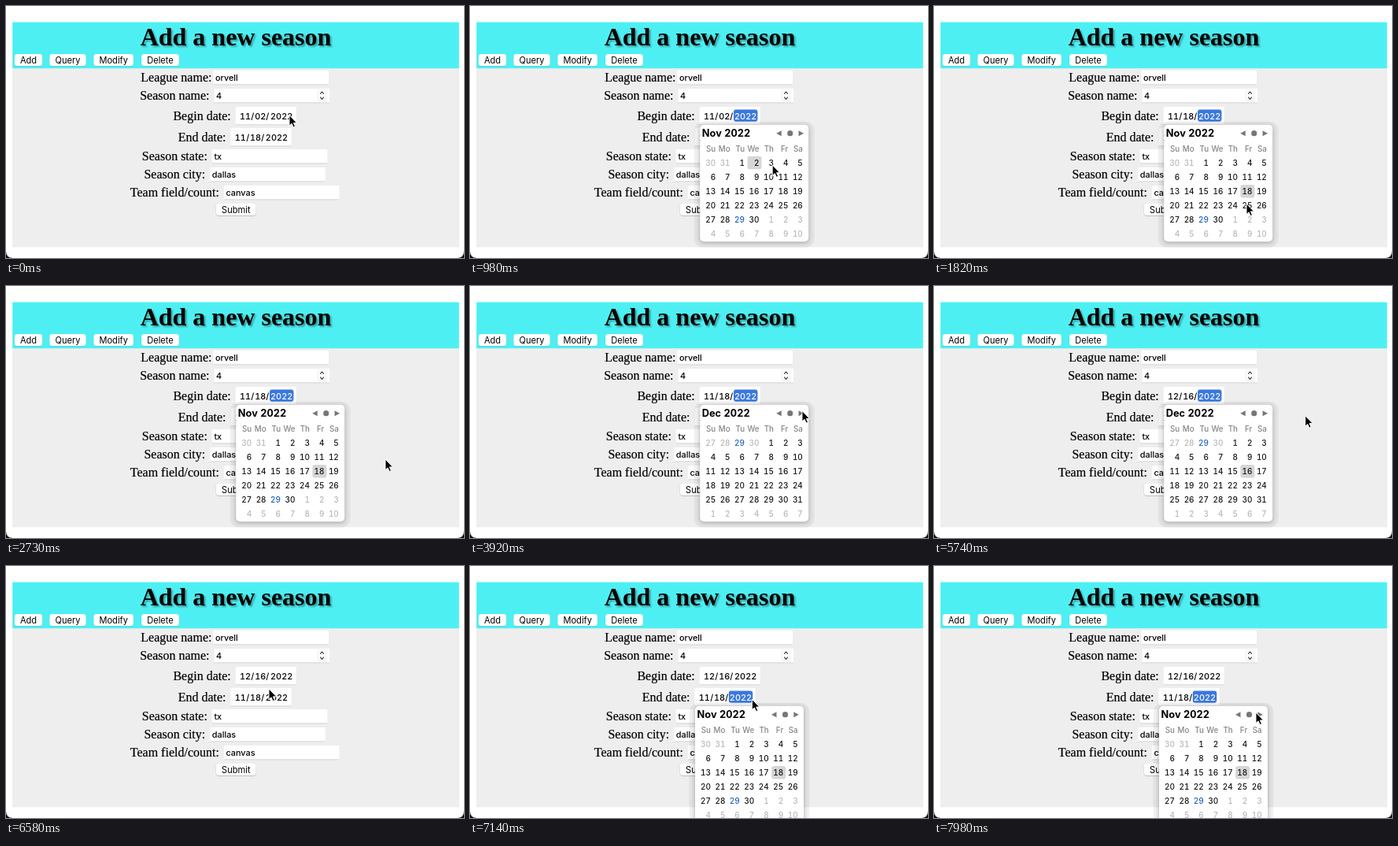
Write an HTML page that moves like this. It is 582 by 320 pixels and loops after 8 s.

```html
<!DOCTYPE html>
<html lang="en">
<head>
<meta charset="utf-8">
<title>Add a new season</title>
<style>
html, body { margin: 0; width: 100%; height: 100%; overflow: hidden; background: #0b1513; }
svg { display: block; }
text { font: 500 10.9px Inter, Roboto, sans-serif; fill: #000; white-space: pre; font-feature-settings: "tnum"; }
.title { font: bold 32px "Liberation Serif", Times, serif; text-anchor: middle; text-shadow: 2px 2px 2px rgba(0,0,0,.35); }
.label { font: 16px "Liberation Serif", Times, serif; stroke: #000; stroke-width: .2px; }
.button { font-weight: 400; font-size: 11.1px; text-anchor: middle; }
.month { font-size: 12.8px; font-weight: 700; }
.head { font-size: 9.8px; fill: #858585; text-anchor: end; }
.day { font-size: 10px; text-anchor: end; }
.panel { filter: drop-shadow(0 1px 2.5px rgba(0,0,0,.3)); }
</style>
</head>
<body>
<svg id="stage" width="582" height="320" viewBox="0 0 582 320"></svg>
<script>
const LOOP = 8000, STEP = 70, MIDDLE = 290.6;
const stage = document.getElementById('stage');

function add(parent, tag, attrs, content) {
  const el = document.createElementNS('http://www.w3.org/2000/svg', tag);
  for (const k in attrs) el.setAttribute(k, attrs[k]);
  if (content !== undefined) el.textContent = content;
  parent.appendChild(el);
  return el;
}
const rect = (p, x, y, width, height, fill, rx = 0) => add(p, 'rect', { x, y, width, height, fill, rx });
const text = (p, x, y, cls, s) => add(p, 'text', { x, y, class: cls }, s);
const path = (p, d, attrs) => add(p, 'path', { d, ...attrs });

function button(cx, cy, s) {
  const caption = text(stage, cx, cy + 4, 'button', s);
  const w = caption.getComputedTextLength() + 14.2, x = cx - w / 2;
  rect(stage, x - .3, cy - 7, w + .6, 15.4, 'rgba(0,0,0,.2)', 4);
  rect(stage, x, cy - 7.6, w, 15.2, '#fff', 3.5);
  stage.append(caption);
}

// Each form row is a label and a field, centred together
let rowTop = 79.5;
function row(label, value, w = 146.5, h = 18) {
  const cy = rowTop + (h + 5) / 2;
  rowTop += h + 4 + (h < 20);
  const caption = text(stage, 0, cy + 5.1, 'label', label);
  const labelWidth = caption.getComputedTextLength() + 2;
  const x = MIDDLE - (labelWidth + w) / 2;
  caption.setAttribute('x', x);
  const g = add(stage, 'g', { transform: `translate(${x + labelWidth} ${cy})` });
  rect(g, 0, -h / 2, w, h, '#fff');
  rect(g, 0, h / 2 - .6, w, .9, '#cfcfcf');
  text(g, 2.5, 4.1, '', value);
  return { g, x: x + labelWidth, y: cy };
}
function dateRow(label) {
  const { g, x, y } = row(label, '', 77, 23);
  const mark = rect(g, 43.3, -8, 30.4, 15.3, '#3a78dd', 3);
  const part = (dx, s) => text(g, dx, 4.1, '', s);
  part(19.6, '/');
  part(38.6, '/');
  const month = part(5.2, ''), day = part(24.4, ''), year = part(44.3, '2022');
  const show = (m, d, focused) => {
    month.textContent = m;
    day.textContent = d;
    mark.style.opacity = focused ? 1 : 0;
    year.style.fill = focused ? '#fff' : '';
  };
  return { show, place: `translate(${x} ${y + 11.2})` };
}

// Page
path(stage, 'M0 0H582V311Q582 320 573 320H9Q0 320 0 311Z', { fill: '#fff' });
rect(stage, 8, 79, 568, 227.3, '#eee');
rect(stage, 8.2, 20.5, 567.5, 58.7, '#4eeff2');
text(stage, 292, 49.5, 'title', 'Add a new season');
button(28.5, 68.6, 'Add');
button(78.5, 68.6, 'Query');
button(136.7, 68.6, 'Modify');
button(196, 68.6, 'Delete');

row('League name:', 'orvell');
const number = row('Season name: ', '4').g;
const begin = dateRow('Begin date: ');
const end = dateRow('End date: ');
row('Season state: ', 'tx');
row('Season city: ', 'dallas');
row('Team field/count: ', 'canvas');
button(292.3, rowTop + 10, 'Submit');

rect(number, 132, -7.5, 10, 14.5, '#d8d8d8', 3);
rect(number, 132.5, -7.5, 9, 14, '#fff', 3);
path(number, 'M134.7 -2.3l2.3-2.6 2.3 2.6M134.7 1.7l2.3 2.6 2.3-2.6',
  { fill: 'none', stroke: '#333', 'stroke-width': 1.1 });

// Calendar
const popup = add(stage, 'g', {});
rect(popup, -7, -4, 153, 160, 'rgba(0,0,0,.05)', 12);
rect(popup, .5, 0, 138, 148.5, '#fff', 5).setAttribute('class', 'panel');
const heading = text(popup, 3, 15.7, 'month', '');
path(popup, 'M104 7.5v7l-6.5-3.5zM125.8 7.5v7l6.5-3.5z', { fill: '#777' });
add(popup, 'circle', { cx: 115, cy: 11, r: 3.6, fill: '#777' });
const colX = c => 20.4 + 18.45 * c, rowY = r => 48.2 + 18.1 * r;
const pick = rect(popup, 0, 0, 18, 16.5, '#d6d6d6', 3);
['Su', 'Mo', 'Tu', 'We', 'Th', 'Fr', 'Sa'].forEach((s, c) => text(popup, colX(c), 34.4, 'head', s));
const cells = Array.from({ length: 42 }, (_, i) =>
  text(popup, colX(i % 7), rowY(i / 7 | 0) + 3.7, 'day', ''));

function calendar(month, chosen) {
  const lead = new Date(2022, month - 1, 1).getDay();
  heading.textContent = (month === 11 ? 'Nov' : 'Dec') + ' 2022';
  cells.forEach((cell, i) => {
    const d = new Date(2022, month - 1, i - lead + 1);
    const today = d.getMonth() === 10 && d.getDate() === 29;
    cell.textContent = d.getDate();
    cell.style.fill = today ? '#1f62b8' : d.getMonth() === month - 1 ? '#151515' : '#b8b8b8';
  });
  pick.style.opacity = chosen ? 1 : 0;
  const i = lead + chosen - 1;
  pick.setAttribute('x', colX(i % 7) - 15);
  pick.setAttribute('y', rowY(i / 7 | 0) - 8.2);
}

// Pointer moves: start time, end time, x, y; it rests in between
const cursor = path(stage, 'M0 0V13.6L3.1 10.8 5.2 15.5 7.5 14.5 5.4 9.9H9.6Z',
  { fill: '#000', stroke: '#fff', 'stroke-width': 1 });
const moves = [
  [140, 280, 353, 140], [770, 1170, 411, 255], [1190, 1400, 400, 237], [1680, 1960, 394, 265],
  [2100, 2590, 482, 220], [2730, 3430, 422, 158.5], [3920, 4200, 399, 230], [4340, 5180, 428, 158],
  [5180, 6020, 487, 167], [6020, 6580, 334, 156], [6650, 6860, 349, 166], [7000, 7560, 409, 186]
];
const ramp = (t, from, to) => Math.min(1, Math.max(0, (t - from) / (to - from)));
function pointer(t) {
  return moves.reduce(([x, y], [from, to, nx, ny]) => {
    const u = ramp(t, from, to), e = u * u * (3 - 2 * u);
    return [x + (nx - x) * e, y + (ny - y) * e];
  }, [360, 138.5]);
}

function draw(now) {
  const t = Math.floor(now % LOOP / STEP) * STEP;
  const second = t >= 6860;
  const moved = t >= 4200;
  const day = moved ? 16 : t >= 1330 ? 18 : 2;
  begin.show(moved ? 12 : 11, String(day).padStart(2, '0'), t >= 420 && t < 5880);
  end.show(11, 18, t >= 6930);

  if (second) calendar(11, 18);
  else if (t >= 3430) calendar(12, moved ? 16 : 0);
  else calendar(11, day);
  popup.setAttribute('transform', (second ? end : begin).place);
  popup.style.opacity = second ? ramp(t, 6860, 7000) : ramp(t, 420, 560) * (1 - ramp(t, 5810, 6020));

  cursor.setAttribute('transform', `translate(${pointer(t)})`);
  requestAnimationFrame(draw);
}
requestAnimationFrame(draw);
</script>
</body>
</html>
```
